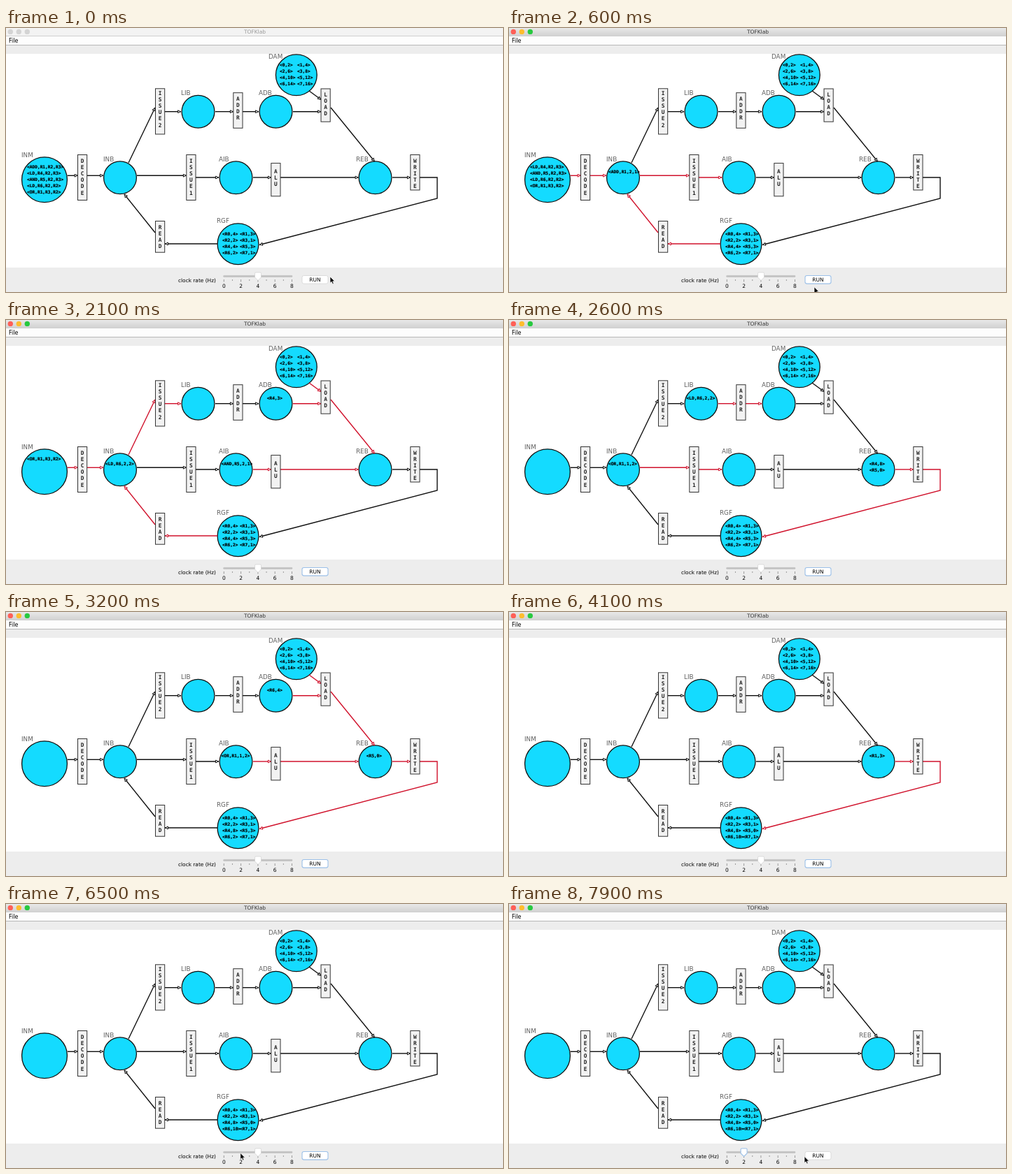
Recreate the animation shown at these times as an HTML page. Size 710 by 378 pixels, loop 8000 ms.

```html
<!DOCTYPE html>
<html lang="en">
<head>
<meta charset="utf-8">
<title>TOFKlab</title>
<style>
  html, body { margin: 0; width: 100%; height: 100%; overflow: hidden; background: #ededed; }
  svg { display: block; width: 710px; height: 378px; }
  text { font-family: "DejaVu Sans", sans-serif; font-size: 7.5px; white-space: pre; }
  .label { font-size: 8.8px; fill: #606060; }
  .token { font: bold 6.2px "DejaVu Sans Mono", monospace; stroke: #000; stroke-width: .2; }
  .letter { font: bold 7.8px "DejaVu Sans Mono", monospace; fill: #222; }
  .mid { text-anchor: middle; }
  .arrow { stroke: #111; stroke-width: 1.4; fill: none; }
  .arrow polygon { fill: #fff; stroke-width: 1; }
  .arrow.hot { stroke: #d0112b; }
</style>
</head>
<body>
<svg viewBox="0 0 710 378">
  <defs>
    <linearGradient id="bar" x2="0" y2="1">
      <stop stop-color="#e8e8e8"/><stop offset="1" stop-color="#d2d2d2"/>
    </linearGradient>
  </defs>
  <rect width="710" height="378" fill="#ededed"/>
  <rect id="titlebar" width="710" height="11" fill="url(#bar)"/>
  <path d="M0 11.5H710" stroke="#cfcfcf"/>
  <rect y="12" width="710" height="12" fill="#fdfdfd"/>
  <path d="M0 24.5H710" stroke="#b8b8b8"/>
  <rect y="37" width="710" height="306" fill="#fff"/>
  <g id="lights"></g>
  <text id="title" class="mid" x="355.5" y="8.3">TOFKlab</text>
  <text x="4" y="21.4" style="font-size:8px">File</text>
  <g id="net"></g>
  <g id="tokens"></g>
  <text x="246" y="364" style="font-size:7.4px">clock rate (Hz)</text>
  <g id="scale"></g>
  <g id="thumb">
    <path id="knob" d="M-4.5 -4.5Q-4.5 -6 -3 -6H3Q4.5 -6 4.5 -4.5V1L0 5.5L-4.5 1Z" fill="#fff"/>
  </g>
  <rect id="run" x="423" y="354.5" width="37" height="11.6" rx="2.6" fill="#fff"/>
  <text class="mid" x="441.5" y="363.2">RUN</text>
  <path id="cursor" d="M0 0V9.2L2.1 7.3L3.6 10.6L5.2 9.9L3.8 6.7H6.7Z" fill="#000" stroke="#fff" stroke-width=".7"/>
</svg>
<script>
const LOOP = 8000, FRAME = 100;
const $ = id => document.getElementById(id);
const text = (cls, x, y, s) =>
  `<text class="${cls}" x="${x}" y="${y}">${s.replace(/</g, "&lt;")}</text>`;

// name: centre x, centre y, radius, label x, label baseline
const places = {
  INM: [55, 217.2, 32.4, 22, 185.4], INB: [163, 214.3, 23.4, 139, 191.2],
  LIB: [274.5, 119.7, 23.4, 250, 96.3], ADB: [385.5, 119.7, 23.4, 361, 96.3],
  AIB: [328.5, 214.3, 23.4, 304, 191.2], REB: [527.5, 214.3, 23.4, 500, 191.2],
  DAM: [414.8, 67.3, 29.4, 375, 43.8], RGF: [331.5, 309.2, 29.4, 301, 279.3]
};

// box left, top, bottom, first letter baseline, then arrows as point lists
const transitions = {
  DECODE: [102.5, 181.5, 246.5, 193, "88,211.3 102.5,211.3", "116,211.3 139,211.3"],
  ISSUE1: [257.8, 181.5, 246.5, 193, "187,211.3 257.8,211.3", "271,214 304,214"],
  ISSUE2: [213.5, 86.8, 152, 96, "175,193 213,114", "227,119.7 250,119.7"],
  ADDR: [324.8, 92.7, 143.3, 104, "299,119.7 324.8,119.7", "338,119.7 361,119.7"],
  LOAD: [450, 87, 134.2, 98, "410,119.7 450,119.7", "433,90 450,102.5", "464,114 526.5,191"],
  ALU: [378.8, 193.6, 240.8, 207.5, "353,214 378.8,214", "392,214 503.5,214"],
  WRITE: [577.8, 181.5, 232, 193, "552,214 577.8,214",
    "591,214 616,214 616,244 362,310.5"],
  READ: [213.5, 276.5, 321.2, 288, "302,309 227,309", "213,293 169,238"]
};

const program = ["<ADD,R1,R2,R3>", "<LD,R4,R2,R3>", "<AND,R5,R2,R3>", "<LD,R6,R2,R2>", "<OR,R1,R3,R2>"];
const add = "<ADD,R1,2,1>", ld4 = "<LD,R4,2,1>", and = "<AND,R5,2,1>",
      ld6 = "<LD,R6,2,2>", or = "<OR,R1,1,2>";

// start time, instructions fetched, enabled transitions, tokens by place
const steps = [
  [0, 0, "", {}],
  [200, 0, "DECODE READ", {}],
  [600, 1, "DECODE READ ISSUE1", { INB: [add] }],
  [1100, 2, "DECODE READ ISSUE2 ALU", { INB: [ld4], AIB: [add] }],
  [1600, 3, "DECODE READ ISSUE1 ADDR WRITE", { INB: [and], LIB: [ld4], REB: ["<R1,3>"] }],
  [2100, 4, "DECODE READ ISSUE2 LOAD ALU", { INB: [ld6], AIB: [and], ADB: ["<R4,3>"] }],
  [2600, 5, "ISSUE1 ADDR WRITE", { INB: [or], LIB: [ld6], REB: ["<R4,8>", "<R5,0>"] }],
  [3100, 5, "ALU LOAD WRITE", { AIB: [or], ADB: ["<R6,4>"], REB: ["<R5,0>"] }],
  [3600, 5, "WRITE", { REB: ["<R6,10>", "<R1,3>"] }],
  [4100, 5, "WRITE", { REB: ["<R1,3>"] }],
  [4600, 5, "", {}]
];

const registersAt = t => [4, 3, 2, 1, t < 3100 ? 4 : 8, t < 3600 ? 3 : 0, t < 4100 ? 2 : 10, 1];

// time, x, y of the pointer tip
const pointer = [
  [0, 463, 356], [200, 441, 358], [350, 441, 358], [800, 432, 381],
  [6100, 350, 381], [6400, 334.8, 356.5], [7500, 334.8, 356.5],
  [7700, 374, 359], [7800, 397, 360.5], [7900, 422, 361.5], [8000, 422, 361.5]
];

function arrow(points) {
  const p = points.split(" ").map(s => s.split(",").map(Number));
  const [x, y] = p[p.length - 1], [px, py] = p[p.length - 2];
  const angle = Math.atan2(y - py, x - px) * 180 / Math.PI;
  return `<polyline points="${points}"/>
    <polygon points="-.5,0 -4.4,-1.9 -4.4,1.9" transform="translate(${x} ${y}) rotate(${angle})"/>`;
}

function buildNet() {
  let out = "";
  for (const [name, [x, y, r, lx, ly]] of Object.entries(places))
    out += `<circle cx="${x}" cy="${y}" r="${r}" fill="#14dbff" stroke="#111" stroke-width="1.3"/>`
      + text("label", lx, ly, name);
  for (const [name, [x, top, bottom, base, ...lines]] of Object.entries(transitions)) {
    out += `<g class="arrow" id="${name}">${lines.map(arrow).join("")}</g>
      <rect x="${x}" y="${top}" width="13.2" height="${bottom - top}" fill="#f2f2f2" stroke="#333"/>`;
    out += [...name].map((c, i) => text("letter mid", x + 6.6, base + i * 9.1, c)).join("");
  }
  $("net").innerHTML = out;
}

function buildScale() {
  let out = `<rect x="310.5" y="354.4" width="98.5" height="2" rx="1" fill="#c4c4c4" stroke="#aaa" stroke-width=".4"/>`;
  for (let i = 0; i <= 8; i++) {
    const x = 311.3 + i * 12.15;
    out += `<path d="M${x} 360v${i % 2 ? 2 : 3.5}" stroke="#777" stroke-width=".7"/>`;
    if (i % 2 === 0) out += text("mid", x, 371.5, String(i));
  }
  $("scale").innerHTML = out;
}

const column = (x, y, list) => list.map((s, i) => text("token", x, y + i * 8.9, s)).join("");
const pairs = (x, y, list) =>
  column(x, y, list.filter((_, i) => i % 2 === 0)) + column(x + 25, y, list.filter((_, i) => i % 2));

function showStep([start, fetched, enabled, held]) {
  const hot = enabled.split(" ");
  for (const name in transitions) $(name).classList.toggle("hot", hot.includes(name));
  let out = column(30, 201, program.slice(fetched));
  for (const name in held) {
    const [x, y, r] = places[name];
    const inset = held[name][0].length < 8 ? 10.6 : 2.4;
    out += column(x - r + inset, y - 6.1, held[name]);
  }
  out += pairs(391, 55, [...Array(8).keys()].map(i => `<${i},${2 * i + 2}>`));
  out += pairs(309, 297.3, registersAt(start).map((v, i) => `<R${i},${v}>`));
  $("tokens").innerHTML = out;
}

function pointerAt(t) {
  const i = Math.max(1, pointer.findIndex(k => k[0] >= t));
  const [t0, x0, y0] = pointer[i - 1], [t1, x1, y1] = pointer[i];
  const f = (t - t0) / (t1 - t0);
  return [x0 + (x1 - x0) * f, y0 + (y1 - y0) * f];
}

function showWindow(t) {
  const active = t >= 100, slid = t >= 6700;
  const colors = active ? ["#ff5f57", "#ffbd2e", "#28c940"] : Array(3).fill("#d4d4d4");
  $("lights").innerHTML = colors.map((c, i) =>
    `<circle cx="${6.3 + i * 12}" cy="5.4" r="3.7" fill="${c}"/>`).join("");
  $("titlebar").setAttribute("fill", active ? "url(#bar)" : "#f3f3f3");
  $("title").setAttribute("fill", active ? "#333" : "#999");
  const ring = (id, on) => {
    $(id).setAttribute("stroke", on ? "#9cc0e8" : "#cacaca");
    $(id).setAttribute("stroke-width", on ? 1.1 : 0.6);
  };
  ring("run", t >= 200 && !slid);
  ring("knob", slid);
  $("thumb").setAttribute("transform", `translate(${slid ? 335.6 : 360} 356)`);
  $("cursor").setAttribute("transform", `translate(${pointerAt(t)})`);
}

let shownStep, shownTime;
function draw(now) {
  const t = Math.floor(now % LOOP / FRAME) * FRAME;
  if (t !== shownTime) {
    shownTime = t;
    showWindow(t);
    const step = steps.filter(s => s[0] <= t).pop();
    if (step !== shownStep) showStep(shownStep = step);
  }
}

buildNet();
buildScale();
const began = performance.now();
function tick() {
  draw(performance.now() - began);
  requestAnimationFrame(tick);
}
tick();
</script>
</body>
</html>
```
